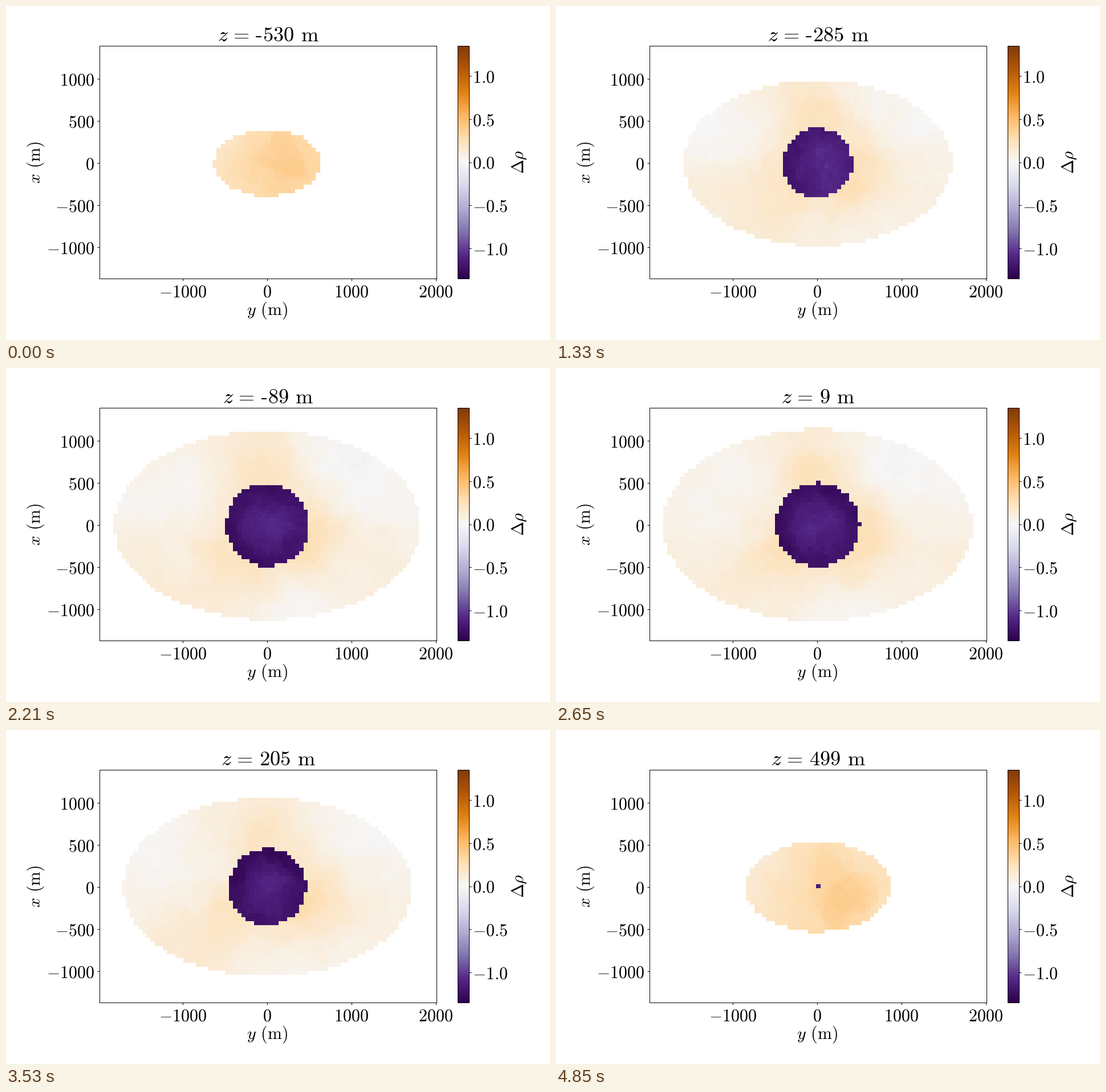
Animation, 954 px wide and 587 px high, one loop 5.07 s. Source, as a matplotlib script:

```python
import numpy as np
import matplotlib.pyplot as plt
from matplotlib.animation import FuncAnimation
from matplotlib.patches import Rectangle

plt.rcParams["mathtext.fontset"] = "cm"

W, H, DPI = 954, 587, 64
LOOP, INTERVAL = 5070, 30
FIRST_HOLD, HOLD, SLICES = 450, 220, 22
Z0, STEP = -530, 49
BODY = np.array([1839, 1141, 564.5])
CORE_RADIUS = 500
STRETCH = np.array([1, 1, 3])  # slices differ more across z than along x, y
VMAX = 1.35
TITLE, LABEL = 36.5, 30

rng = np.random.default_rng(4)


def px(n):
    """Pixels to points."""
    return n * 72 / DPI


def shell_trend(y, x, z):
    """Three-lobed field with a halo round the core and dense poles."""
    theta, flat = np.arctan2(x, y), np.hypot(x, y)
    swirl = flat / (flat + 200)
    lobes = 0.07 * np.cos(3 * (theta + np.radians(20))) * swirl
    east = np.cos(theta + 0.25) * swirl
    gap = np.maximum(np.sqrt(flat ** 2 + z ** 2) - CORE_RADIUS, 0)
    halo = (0.15 + 0.08 * east) * np.exp(-(gap / 350) ** 2)
    poles = 0.3 * (z / BODY[2]) ** 6 * (1 + 0.4 * np.tanh(y / 300))
    return 0.06 + lobes - 0.03 * east + halo + poles


def core_trend(y, x, z):
    reach = ((y - 40) ** 2 + (x + 20) ** 2) / CORE_RADIUS ** 2
    return -1.08 - 0.25 * reach - 0.0001 * z


def random_models(axes, trend, count, noise, models=25):
    """Random anchors in an ellipsoid, each carrying a noisy trend value."""
    result = []
    for _ in range(models):
        way = rng.normal(size=(count, 3))
        way /= np.linalg.norm(way, axis=1, keepdims=True)
        pts = way * np.sqrt(rng.random((count, 1))) * axes
        result.append((pts * STRETCH,
                       trend(*pts.T) + rng.normal(0, noise, count)))
    return result


def mosaic(points, models):
    """Mean of the nearest-anchor values over all models."""
    total = np.zeros(len(points))
    for anchors, values in models:
        dist = (anchors ** 2).sum(1) - 2 * (points * STRETCH) @ anchors.T
        total += values[dist.argmin(1)]
    return total / len(models)


ys = 9 + STEP * np.arange(-38, 39)
xs = 9 + STEP * np.arange(-24, 25)
Y, X = np.meshgrid(ys, xs)
shell = random_models(BODY, shell_trend, 260, 0.08)
core = random_models(np.full(3, CORE_RADIUS), core_trend, 80, 0.1)


def density(z):
    a, b, c = BODY
    body = (Y / a) ** 2 + (X / b) ** 2 + (z / c) ** 2 <= 1
    ball = X ** 2 + Y ** 2 + z ** 2 <= CORE_RADIUS ** 2
    grid = np.full(Y.shape, np.nan)
    for mask, models in ((body & ~ball, shell), (ball, core)):
        pts = np.column_stack([Y[mask], X[mask], np.full(mask.sum(), z)])
        grid[mask] = mosaic(pts, models)
    return grid


depths = [Z0 + STEP * k for k in range(SLICES)]
slices = [density(z) for z in depths]

fig = plt.figure(figsize=(W / DPI, H / DPI), dpi=DPI, facecolor="white")


def box(left, top, right, bottom):
    return fig.add_axes([left / W, 1 - bottom / H,
                         (right - left) / W, (bottom - top) / H])


def label(x, y, text, size=LABEL, ha="center", **kw):
    return fig.text(x / W, 1 - y / H, text, fontsize=px(size), ha=ha,
                    va="baseline", rotation_mode="anchor", **kw)


ax = box(164, 70, 755, 479)
half = STEP / 2
image = ax.imshow(slices[0], cmap="PuOr_r", vmin=-VMAX, vmax=VMAX,
                  origin="lower", interpolation="nearest", aspect="auto",
                  extent=(ys[0] - half, ys[-1] + half,
                          xs[0] - half, xs[-1] + half))
ax.set(xlim=(-1990, 2010), ylim=(-1376, 1396),
       xticks=range(-1000, 2001, 1000), yticks=range(-1000, 1001, 500))
ax.xaxis.set_major_formatter("${x:.0f}$")
ax.yaxis.set_major_formatter("${x:.0f}$")
ax.tick_params(labelsize=px(LABEL), length=px(4), width=px(1), pad=px(5))
for spine in ax.spines.values():
    spine.set_linewidth(px(1))

bar = fig.colorbar(image, cax=box(792, 70, 812, 479),
                   ticks=np.arange(-1, 1.1, 0.5), format="${x:.1f}$")
bar.outline.set_linewidth(px(1))
bar.ax.tick_params(labelsize=px(LABEL), length=px(4), width=px(1), pad=px(1.5))

label(458, 542.5, r"$y\hspace{0.38}\mathrm{(m)}$")
label(60, 275, r"$x\hspace{0.38}\mathrm{(m)}$", rotation=90)
label(908, 274, r"$\Delta\rho$", rotation=90)

title = label(371, 61.5, "", TITLE, ha="left")
hyphen = Rectangle((0, 1 - 55 / H), 0.265 * TITLE / W, 2 / H,
                   color="black", lw=0, transform=fig.transFigure)
fig.add_artist(hyphen)


def set_title(z):
    digits = str(abs(z))
    lead, gap = 1.85, 0.333 if z < 0 else 0
    width = lead + gap + 0.5 * len(digits) + 1.166
    left = 459 - width * TITLE / 2
    title.set_x(left / W)
    title.set_text(rf"$z\hspace{{0.14}}=\hspace{{{0.14 + gap / 0.878:.3f}}}"
                   rf"{digits}\hspace{{0.38}}\mathrm{{m}}$")
    hyphen.set_x((left + (lead + 0.011) * TITLE) / W)
    hyphen.set_visible(z < 0)


def update(frame):
    now = (frame + 1) * INTERVAL - 1
    k = min(max(0, (now - FIRST_HOLD) // HOLD + 1), SLICES - 1)
    image.set_data(slices[k])
    set_title(depths[k])
    return image, title, hyphen


anim = FuncAnimation(fig, update, frames=LOOP // INTERVAL, interval=INTERVAL,
                     repeat=True, repeat_delay=0, blit=False)
plt.show()
```
